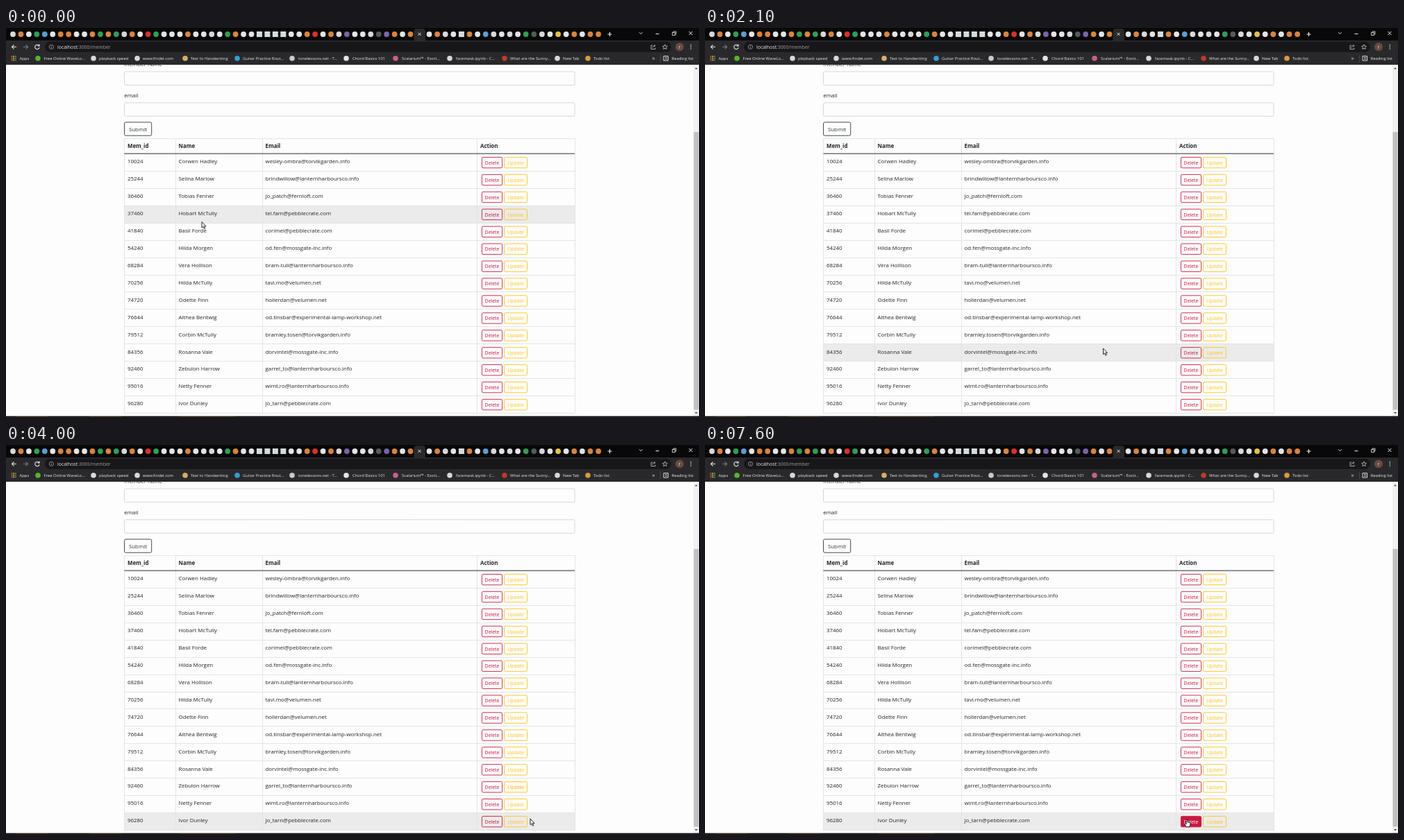
Write an HTML page with a canvas that moves like this. It is 998 px wide and 561 px high and loops after 8 s.

```html
<!DOCTYPE html>
<html lang="en">
<head>
<meta charset="utf-8">
<title>Member table</title>
<style>
html, body { margin: 0; width: 100%; height: 100%; overflow: hidden; background: #fdfdfd; }
canvas { display: block; width: 998px; height: 561px; }
</style>
</head>
<body>
<canvas id="stage" width="998" height="561"></canvas>
<script>
const ctx = document.getElementById('stage').getContext('2d');
const LOOP = 8000, STEP = 100;
const FONT = '"Open Sans", "Noto Sans", sans-serif';
const PAGE = '#fdfdfd', INK = '#212529', LINE = '#e1e4e7', BAR = '#29292b', LIGHT = '#e8eaed';
const ROW_TOP = 181.5, ROW_H = 24.93;
const COLS = [170.5, 244, 369, 678.5, 819];

const members = [
  ['10024', 'Corwen Hadley', 'wesley-ombra@torvikgarden.info'],
  ['25244', 'Selina Marlow', 'brindwillow@lanternharboursco.info'],
  ['36460', 'Tobias Fenner', 'jo_patch@fernloft.com'],
  ['37460', 'Hobart McTully', 'tel.fam@pebblecrate.com'],
  ['41840', 'Basil Forde', 'corimel@pebblecrate.com'],
  ['54240', 'Hilda Morgen', 'od.fen@mossgate-inc.info'],
  ['68284', 'Vera Hollison', 'bram-tull@lanternharboursco.info'],
  ['70256', 'Hilda McTully', 'tavi.mo@velumen.net'],
  ['74720', 'Odette Finn', 'hollerdan@velumen.net'],
  ['76644', 'Althea Bentwig', 'od.tinsbar@experimental-lamp-workshop.net'],
  ['79512', 'Corbin McTully', 'bramley.tosen@torvikgarden.info'],
  ['84356', 'Rosanna Vale', 'dorvintel@mossgate-inc.info'],
  ['92460', 'Zebulon Harrow', 'garrel_to@lanternharboursco.info'],
  ['95016', 'Netty Fenner', 'wimt.ro@lanternharboursco.info'],
  ['96280', 'Ivor Dunley', 'jo_tarn@pebblecrate.com']
];

const buttons = [
  { label: 'Delete', x: 685, w: 30, rgb: [200, 25, 63], on: [255, 255, 255] },
  { label: 'Update', x: 717.1, w: 33.8, rgb: [255, 196, 25], on: [33, 37, 41] }
];

// Pointer path: time, x, y
const path = [
  [0, 282, 279.5], [1400, 282, 279.5], [1500, 296, 297], [1600, 328, 334], [1700, 368, 367],
  [1800, 418, 400], [1900, 470, 430], [2000, 523, 452], [2100, 573.5, 462], [2200, 610, 474],
  [2300, 645, 487], [2400, 668, 496], [2600, 694, 510], [2800, 700, 517], [2950, 700, 517],
  [3100, 709, 512], [3200, 718, 500], [3400, 731, 493], [3600, 735, 492], [3700, 739, 492],
  [3800, 748, 495], [3900, 755, 520], [4000, 755, 539], [4200, 744, 541], [4400, 730, 541],
  [4500, 720, 541], [4600, 694, 540], [8000, 694, 540]
];

const tabColors = {
  w: '#d8d8d8', g: '#e4e4e4', o: '#d9833d', e: '#2f9d58', b: '#5b9bd5', r: '#d9302c',
  s: '#d5dcd8', p: '#7a62a8', d: '#55585c', y: '#e3c04a'
};
const tabsLeft = 'wogebgooggoeoewogregggoggwgeoggssssggorgowpggwdpogo';
const tabsRight = 'gowgsogbwgwgedwgygogoo';

const bookmarks = [
  [46, '#58b32c', 54.5, 'Free Online WaveLo...'], [126, '#d8d8d8', 134, 'playback speed'],
  [189, '#d8d8d8', 197, 'www.findel.com'], [258, '#d8ad6a', 266, 'Text to Handwriting'],
  [333, '#2f9fd8', 341, 'Guitar Practice Rout...'], [412, '#c9c9c9', 421, 'tonelessons.net - T...'],
  [490, '#e4e4e4', 499, 'Chord Basics 101'], [561, '#c95f8f', 570, 'Scalarium™ - Exoti...'],
  [639, '#d8d8d8', 648, 'facemask.ipynb - C...'], [718, '#c0392b', 726, 'What are the Sunny...'],
  [794, '#d8d8d8', 802, 'New Tab'], [838, '#d99a3d', 846, 'Todo list']
];

function rect(x, y, w, h, color) {
  ctx.fillStyle = color;
  ctx.fillRect(x, y, w, h);
}

function text(str, x, y, size, color, weight = 400, align = 'left') {
  ctx.font = `${weight} ${size}px ${FONT}`;
  ctx.textAlign = align;
  ctx.fillStyle = color;
  ctx.fillText(str, x, y);
}

function disc(x, y, r, color) {
  ctx.fillStyle = color;
  ctx.beginPath();
  ctx.arc(x, y, r, 0, Math.PI * 2);
  ctx.fill();
}

function box(x, y, w, h, r, stroke, fill, width = 1) {
  ctx.beginPath();
  ctx.roundRect(x, y, w, h, r);
  if (fill) { ctx.fillStyle = fill; ctx.fill(); }
  if (stroke) { ctx.strokeStyle = stroke; ctx.lineWidth = width; ctx.stroke(); }
}

function stroke(d, color = LIGHT, width = 1) {
  ctx.strokeStyle = color;
  ctx.lineWidth = width;
  ctx.stroke(new Path2D(d));
}

function pointer(t) {
  t = Math.max(0, t);
  const i = Math.max(1, path.findIndex(p => p[0] >= t));
  const [t0, x0, y0] = path[i - 1], [t1, x1, y1] = path[i];
  const k = (t - t0) / (t1 - t0);
  return [x0 + (x1 - x0) * k, y0 + (y1 - y0) * k];
}

// The page reacts slightly after the pointer moves.
const reaction = t => pointer(t - 40);
const rowAt = y => Math.floor((y - ROW_TOP) / ROW_H);
const buttonTop = row => 186.4 + row * ROW_H;

function isOver(btn, row, [x, y]) {
  const top = buttonTop(row);
  return x >= btn.x && x <= btn.x + btn.w && y >= top && y <= top + 15.6;
}

// Share of the last 150 ms spent over the button
function hoverAmount(btn, row, t) {
  const n = 15;
  let hits = 0;
  for (let i = 0; i < n; i++) if (isOver(btn, row, reaction(t - i * 10))) hits++;
  return hits / n;
}

function drawTabs() {
  rect(0, 0, 998, 18, '#080808');
  const icon = (kind, x) => kind === 's'
    ? rect(x - 4, 5, 8, 8, tabColors.s)
    : disc(x, 9, 3.9, tabColors[kind]);
  [...tabsLeft].forEach((k, i) => icon(k, 10 + i * 11.45));
  [...tabsRight].forEach((k, i) => icon(k, 609.5 + i * 11.6));
  box(587.5, 1, 16.5, 20, 4, null, BAR);
  stroke('M593.5 6.8l4 4m0-4l-4 4');
  stroke('M866.5 9h6m-3-3v6', LIGHT, 1.2);
  stroke('M912 6.3l2.3 2.3 2.3-2.3');
  stroke('M935.5 8.5h5');
  stroke('M959.5 6.5h4v4h-4zM961 6.5v-1.5h4v4h-1.5', LIGHT, 0.8);
  stroke('M983.5 5l5 5m0-5l-5 5');
}

function drawToolbar() {
  rect(0, 18, 998, 35, BAR);
  stroke('M15 27.3h-6.5m3-3l-3 3 3 3', LIGHT, 1.1);
  stroke('M25 27.3h6.5m-3-3l3 3-3 3', '#7d7d80', 1.1);
  stroke('M47.5 25.5a3.2 3.2 0 1 0 .6 2.6M48 23.5v2.5h-2.5', LIGHT, 1.1);
  box(56, 19.8, 902, 15, 7.5, null, '#171719');
  stroke('M62.3 27.3a3.1 3.1 0 1 0 6.2 0a3.1 3.1 0 1 0 -6.2 0M65.4 26.8v2.2M65.4 25.2v.8', '#b4b6ba', 0.7);
  text('localhost', 74, 29.8, 6.9, LIGHT);
  const hostWidth = ctx.measureText('localhost').width;
  text(':3000/member', 74 + hostWidth, 29.8, 6.9, '#9aa0a6');
  stroke('M931 25h-2v5.5h6v-2M930.8 28.5c.3-2 1.5-3 4-3m-1.5-1.7l1.7 1.7-1.7 1.7', '#c8cacd', 0.8);
  stroke('M949 23.8l1 2.3 2.5.2-1.9 1.7.6 2.5-2.2-1.3-2.2 1.3.6-2.5-1.9-1.7 2.5-.2z', '#c8cacd', 0.8);
  disc(970, 27.3, 6, '#6b4a45');
  text('r', 970, 29.7, 7, '#f0e8e6', 400, 'center');
  for (const y of [24.6, 27.3, 30]) disc(986.3, y, 0.8, LIGHT);

  const colors = ['#d9534f', '#d9b23d', '#4c9c5c'];
  for (let i = 0; i < 9; i++)
    rect(7.5 + i % 3 * 2.7, 40 + Math.floor(i / 3) * 2.7, 1.8, 1.8, colors[i % 3]);
  text('Apps', 19.5, 46, 5.9, LIGHT);
  for (const [ix, color, tx, label] of bookmarks) {
    disc(ix, 43.7, 3.8, color);
    text(label, tx, 46, 5.9, LIGHT);
  }
  text('»', 930.5, 46, 8, LIGHT);
  rect(942, 39, 0.6, 10, '#5a5b5e');
  stroke('M947 40.5h6.5v6.5h-6.5zM949 42.5h3M949 44.8h3', LIGHT, 0.9);
  text('Reading list', 958.5, 46, 5.9, LIGHT);
}

function drawForm() {
  ctx.save();
  ctx.beginPath();
  ctx.rect(0, 53, 990, 10);
  ctx.clip();
  text('member name', 170.3, 55.3, 7.9, INK);
  ctx.restore();
  box(170.5, 63, 648.5, 19.4, 2, '#d3d7dc', PAGE);
  text('email', 170.3, 100.2, 7.9, INK);
  box(170.5, 107.8, 648.5, 19.4, 2, '#d3d7dc', PAGE);
  box(170.5, 135.9, 39.2, 19.3, 2, '#454a50', PAGE);
  text('Submit', 190, 148.6, 7.9, '#343a40', 400, 'center');
}

function drawButton(btn, row, t) {
  const k = hoverAmount(btn, row, t), top = buttonTop(row);
  const rgb = btn.rgb.join();
  const ink = btn.rgb.map((c, i) => Math.round(c + (btn.on[i] - c) * k)).join();
  box(btn.x + 0.4, top, btn.w - 0.8, 15.4, 1.8, `rgb(${rgb})`, k ? `rgba(${rgb},${k})` : null, 0.9);
  text(btn.label, btn.x + btn.w / 2, top + 10.4, 6.9, `rgb(${ink})`, 400, 'center');
}

function drawTable(t) {
  const hovered = rowAt(reaction(t)[1]);
  const left = COLS[0], width = COLS[4] - left;
  const bottom = ROW_TOP + ROW_H * members.length;
  rect(left, ROW_TOP + hovered * ROW_H, width, ROW_H, '#ebebeb');

  rect(left, 159, width, 1, LINE);
  for (let i = 1; i <= members.length; i++)
    rect(left, Math.round(ROW_TOP + i * ROW_H - 0.5), width, 1, LINE);
  for (const x of COLS) rect(Math.floor(x), 159, 1, bottom - 159, LINE);
  rect(left, 180.6, width, 1.1, '#3b4046');

  ['Mem_id', 'Name', 'Email', 'Action'].forEach((label, i) =>
    text(label, COLS[i] + 4.5, 173.4, 7.9, INK, 700));
  members.forEach((cells, row) => {
    cells.forEach((cell, i) => text(cell, COLS[i] + 4.5, 195.3 + row * ROW_H, 7.9, INK));
    for (const btn of buttons) drawButton(btn, row, t);
  });
}

function drawEdges() {
  rect(990, 53, 8, 507, '#f1f1f1');
  rect(990.5, 150, 7, 400.5, '#c1c1c1');
  ctx.fillStyle = '#505050';
  ctx.fill(new Path2D('M991.8 59.3l2.2-2.4 2.2 2.4zM991.8 554l2.2 2.4 2.2-2.4z'));
  rect(0, 559.7, 998, 1.3, '#141210');
  for (const [x, w] of [[15, 45], [120, 46], [250, 80]]) rect(x, 560, w, 1, '#3a2612');
}

function drawPointer(t) {
  const [x, y] = pointer(t), spot = reaction(t);
  const row = rowAt(spot[1]);
  const hand = buttons.some(b => isOver(b, row, spot));
  const shape = new Path2D(hand
    ? 'M-.9 .8a.9.9 0 0 1 1.8 0v3l3 .6q1.2 .3 1.1 1.6l-.4 2.6-.8 2.2h-4.5l-2.5-3.7q-.5-1.2.6-1.3l1.7 1.2z'
    : 'M0 0v8.6l1.9-1.7 1.5 3.3 1.4-.6-1.4-3.2h2.6z');
  ctx.save();
  ctx.translate(x, y);
  ctx.lineJoin = 'round';
  ctx.lineWidth = 0.9;
  ctx.strokeStyle = '#111';
  ctx.fillStyle = '#fff';
  ctx.fill(shape);
  ctx.stroke(shape);
  ctx.restore();
}

function draw(t) {
  rect(0, 0, 998, 561, PAGE);
  drawForm();
  drawTable(t);
  drawTabs();
  drawToolbar();
  drawEdges();
  drawPointer(t);
}

const start = performance.now();
function frame() {
  const t = (performance.now() - start) % LOOP;
  draw(Math.floor(t / STEP) * STEP);
  requestAnimationFrame(frame);
}
frame();
</script>
</body>
</html>
```
